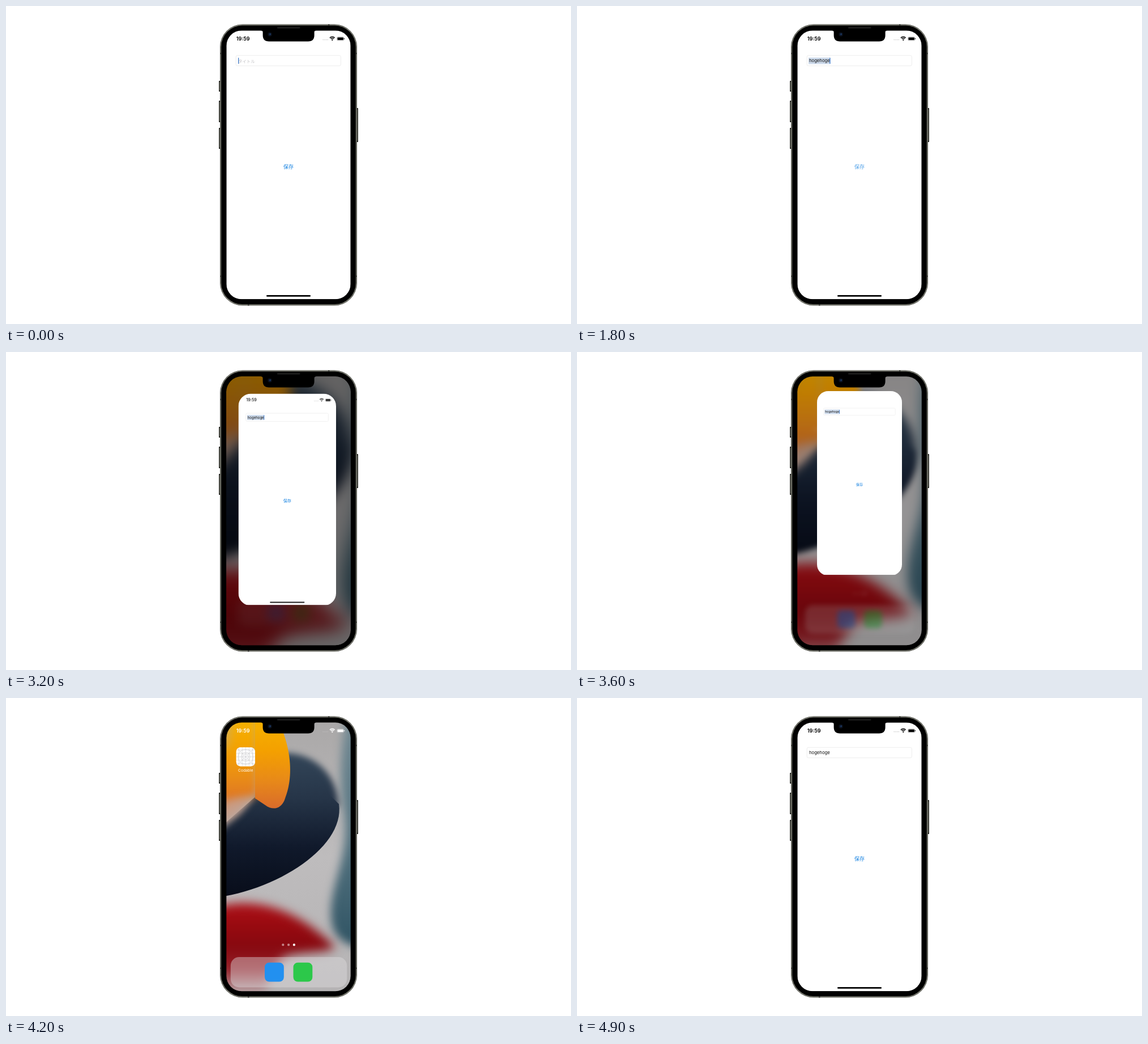
An HTML page with a canvas for the animation above (5 s loop, 998 by 561 pixels).

```html
<!DOCTYPE html>
<html lang="ja">
<head>
<meta charset="utf-8">
<title>Phone demo</title>
<style>
  html, body { margin: 0; width: 100%; height: 100%; overflow: hidden; background: #fff; }
  canvas { display: block; width: 998px; height: 561px; }
</style>
</head>
<body>
<canvas id="stage"></canvas>
<script>
const W = 998, H = 561, LOOP = 5000, STEP = 100;
const LATIN = 'Inter, "Noto Sans", sans-serif';
const JAPANESE = '"Noto Sans CJK JP", "Noto Sans CJK", sans-serif';
const TYPED = 'hogehoge';

// Poses of the app card
const SCREEN = { x: 389.3, y: 43.3, w: 219.4, h: 474 };
const HELD = { x: 410.5, y: 73.5, w: 172.5, h: 374 };
const THROWN = { x: 424, y: 69, w: 150, h: 325.5 };
const ICON = { x: 406.5, y: 87, w: 33.6, h: 33.6 };

const SELECT = 1300, PRESS = 1500, SWIPE = 3000, RELEASE = 3600, HOME = 4100, LAUNCH = 4400, OPEN = 4900;

const canvas = document.getElementById('stage');
const dpr = window.devicePixelRatio || 1;
canvas.width = W * dpr;
canvas.height = H * dpr;
const ctx = canvas.getContext('2d');
ctx.scale(dpr, dpr);

const clamp = v => Math.max(0, Math.min(1, v));
const span = (t, from, to) => clamp((t - from) / (to - from));
const easeOut = k => 1 - Math.pow(1 - k, 2.5);

function mix(a, b, k) {
  const at = key => a[key] + (b[key] - a[key]) * k;
  return { x: at('x'), y: at('y'), w: at('w'), h: at('h') };
}

function cardPose(t) {
  if (t >= LAUNCH) return mix(ICON, SCREEN, easeOut(span(t, LAUNCH, OPEN)));
  if (t >= RELEASE) return mix(THROWN, ICON, easeOut(span(t, RELEASE, HOME)));
  if (t >= 3200) return mix(HELD, THROWN, span(t, 3200, RELEASE));
  return mix(SCREEN, HELD, 0.25);
}

const homeProgress = t => t < LAUNCH ? span(t, 3200, 4000) : 1 - easeOut(span(t, LAUNCH, OPEN));

// One key per step, with a one-step pause after the fifth
const typedCount = t => Math.round(5 * span(t, 300, 800) + 3 * span(t, 900, 1200));

function cursorAlpha(t) {
  if (t < SELECT) return 1;
  const phase = Math.min(t, SWIPE) % 1000;
  return clamp((Math.abs(phase - 550) - 50) / 200);
}

const buttonAlpha = t => t < PRESS ? 1 : 0.25 + 0.75 * span(t, 1600, 1900);

function box(c, x, y, w, h, r, fill) {
  c.beginPath();
  c.roundRect(x, y, w, h, r);
  c.fillStyle = fill;
  c.fill();
}

function dot(c, x, y, r, fill) {
  c.beginPath();
  c.arc(x, y, r, 0, Math.PI * 2);
  c.fillStyle = fill;
  c.fill();
}

function label(c, text, x, y, font, fill, align = 'left') {
  c.font = font;
  c.fillStyle = fill;
  c.textAlign = align;
  c.fillText(text, x, y);
}

function faded(c, alpha, draw) {
  c.save();
  c.globalAlpha *= alpha;
  draw();
  c.restore();
}

function layer(draw) {
  const el = document.createElement('canvas');
  el.width = W * dpr;
  el.height = H * dpr;
  const c = el.getContext('2d');
  c.scale(dpr, dpr);
  draw(c);
  return el;
}

function drawLayer(image, scale, blur, alpha) {
  ctx.save();
  if (blur > 0.1) ctx.filter = `blur(${blur * dpr}px)`;
  ctx.globalAlpha = alpha;
  ctx.translate(499, 281);
  ctx.scale(scale, scale);
  ctx.drawImage(image, -499, -281, W, H);
  ctx.restore();
}

function ramp(c, y0, y1, ...colors) {
  const g = c.createLinearGradient(0, y0, 0, y1);
  colors.forEach((col, i) => g.addColorStop(i / (colors.length - 1), col));
  return g;
}

function blob(c, path, fill, blur = 0) {
  c.filter = blur ? `blur(${blur * dpr}px)` : 'none';
  c.fillStyle = fill;
  c.fill(new Path2D(path));
  c.filter = 'none';
}

const wallpaper = layer(c => {
  const teal = ramp(c, 60, 440, '#6f8791', '#557481', '#2f5363');
  const navy = ramp(c, 90, 350, '#34475a', '#263548', '#10192b', '#080d1a');
  const red = ramp(c, 355, 520, '#b0121a', '#9b0a10', '#86080f', '#952028', '#b8abad');
  const orange = ramp(c, 43, 195, '#f5b000', '#f4a000', '#e88a18', '#d96b2b');

  c.fillStyle = ramp(c, 43, 517, '#aaa8a8', '#bebcbd', '#b5b3b4');
  c.fillRect(0, 0, W, H);
  blob(c, 'M650 20H604C590 90 588 150 598 210C606 280 572 330 574 385C576 420 592 438 650 445Z', teal, 8);
  blob(c, 'M490 97C550 97 586 140 587 190L530 235L440 180Z', navy, 6);
  blob(c, 'M340 355C465 350 600 266 588 187L560 160L500 130L436 178L340 262Z', navy);
  blob(c, 'M340 130H440L434 178Q408 215 340 258Z', '#b9a69d', 7);
  blob(c, 'M340 380C415 345 500 358 582 440C560 452 515 446 490 458C470 480 455 510 440 570H340Z', red, 9);
  blob(c, 'M340 20H445V172Q400 180 340 210Z', orange, 8);
  blob(c, 'M440 20H470C495 60 515 125 492 180C485 197 470 198 458 189L440 177Z', orange);
  blob(c, 'M340 190L390 178L432 176L410 204L340 240Z', 'rgba(205,155,130,.6)', 7);
  blob(c, 'M340 20H398L390 85L340 110Z', 'rgba(185,172,145,.75)', 10);
});

function statusBar(c, color, dots) {
  label(c, '19:59', 406.8, 61, '600 9px ' + LATIN, color);
  for (let i = 0; i < 4; i++) dot(c, 560.2 + i * 2.7, 59.6, 0.7, dots);
  c.strokeStyle = color;
  c.lineWidth = 1.4;
  for (const r of [6.3, 3.9]) {
    c.beginPath();
    c.arc(576.3, 60.6, r, -Math.PI * 0.75, -Math.PI * 0.25);
    c.stroke();
  }
  c.beginPath();
  c.moveTo(576.3, 61.2);
  c.arc(576.3, 61.2, 2.3, -Math.PI * 0.75, -Math.PI * 0.25);
  c.fillStyle = color;
  c.fill();
  faded(c, 0.5, () => {
    c.lineWidth = 0.6;
    c.beginPath();
    c.roundRect(584.7, 54.7, 12, 6.2, 1.8);
    c.stroke();
  });
  box(c, 585.5, 55.5, 10.4, 4.6, 1.1, color);
  box(c, 597.2, 56.8, 0.8, 2, 0.4, color);
}

function appScreen(t) {
  const relaunched = t >= LAUNCH;
  const chrome = relaunched ? span(t, LAUNCH, 4700) : 1 - span(t, 3100, RELEASE);
  ctx.fillStyle = '#fff';
  ctx.fillRect(SCREEN.x, SCREEN.y, SCREEN.w, SCREEN.h);

  faded(ctx, chrome, () => {
    statusBar(ctx, '#000', '#aaa');
    box(ctx, 460, 510, 78, 2.8, 1.4, '#000');
  });

  ctx.strokeStyle = '#e9e9e9';
  ctx.lineWidth = 0.8;
  ctx.beginPath();
  ctx.roundRect(406.2, 87.2, 185.2, 18.4, 2.6);
  ctx.stroke();

  const text = TYPED.slice(0, typedCount(t));
  const font = '400 7.7px ' + LATIN;
  ctx.font = font;
  const end = 410 + ctx.measureText(text).width;
  if (t >= SELECT && !relaunched) box(ctx, 409, 91, end - 408.6, 11.4, 0, '#cddaeb');
  if (text) label(ctx, text, 410, 99.3, font, '#111');
  else label(ctx, 'タイトル', 410, 99.5, '400 7.4px ' + JAPANESE, '#c3c3c6');
  if (!relaunched) {
    faded(ctx, cursorAlpha(t), () =>
      box(ctx, text ? end - 0.4 : 410.1, 91.2, 1.2, 10.8, 0.5, '#2f6fc4'));
  }
  faded(ctx, buttonAlpha(t), () =>
    label(ctx, '保存', 499, 287.4, '400 9px ' + JAPANESE, '#1480e0', 'center'));
}

function gridIcon(c, { x, y, w, h }) {
  c.save();
  c.translate(x, y);
  c.scale(w / 100, h / 100);
  box(c, 0, 0, 100, 100, 24, '#fff');
  c.clip();
  c.strokeStyle = '#b4b4b8';
  c.lineWidth = 1.2;
  c.beginPath();
  for (let p = 14; p < 100; p += 18) {
    c.moveTo(p, 0); c.lineTo(p, 100);
    c.moveTo(0, p); c.lineTo(100, p);
  }
  c.moveTo(0, 0); c.lineTo(100, 100);
  c.moveTo(100, 0); c.lineTo(0, 100);
  for (const r of [14, 24, 40]) {
    c.moveTo(50 + r, 50);
    c.arc(50, 50, r, 0, Math.PI * 2);
  }
  c.stroke();
  c.restore();
}

const homeIcons = layer(c => {
  label(c, 'Codable', 423.2, 130, '400 6.7px ' + LATIN, '#fff', 'center');
  for (let i = 0; i < 3; i++) {
    dot(c, 489.3 + i * 9.8, 435.4, 2.1, i === 2 ? '#fff' : 'rgba(255,255,255,.5)');
  }
  box(c, 396.8, 457, 205.4, 53.5, 15, 'rgba(225,222,223,.42)');
  box(c, 457, 466.7, 33.8, 33.8, 8, '#2290f0');
  box(c, 507.5, 466.7, 33.8, 33.8, 8, '#2cc84a');
});

function homeScreen(progress) {
  const away = 1 - progress;
  drawLayer(wallpaper, 1 + 0.26 * away, 11 * away, 1);
  drawLayer(homeIcons, 1 - 0.12 * away, 9 * away, 0.3 + 0.7 * progress * progress);
  faded(ctx, span(progress, 0.6, 1), () => statusBar(ctx, '#fff', 'rgba(255,255,255,.3)'));
  ctx.fillStyle = `rgba(0,0,0,${0.43 * away})`;
  ctx.fillRect(SCREEN.x, SCREEN.y, SCREEN.w, SCREEN.h);
}

function card(t) {
  const pose = cardPose(t);
  const scale = pose.w / SCREEN.w;
  ctx.save();
  ctx.beginPath();
  ctx.roundRect(pose.x, pose.y, pose.w, pose.h, 8 + (pose.w - ICON.w) * 0.1);
  ctx.clip();
  ctx.save();
  ctx.translate(pose.x, pose.y);
  ctx.scale(scale, scale);
  ctx.translate(-SCREEN.x, -SCREEN.y);
  appScreen(t);
  ctx.restore();
  faded(ctx, 1 - span(pose.w, 50, 105), () => gridIcon(ctx, pose));
  ctx.restore();
}

function sideButton(x, y, h) {
  box(ctx, x, y, 3, h, 0.8, '#22231f');
  box(ctx, x + 0.9, y + 2, 0.8, h - 4, 0.4, '#85867c');
}

function phoneBody() {
  sideButton(376, 132, 19);
  sideButton(376, 167, 38);
  sideButton(376, 215, 37);
  sideButton(619, 180, 60);
  [[0, '#34352f'], [0.8, '#a6a79b'], [1.7, '#2a2b27'], [2.4, '#000']].forEach(([d, color]) =>
    box(ctx, 378 + d, 32.2 + d, 242 - 2 * d, 496.3 - 2 * d, 40 - d, color));
  const band = (x, y) => box(ctx, x, y, 2.5, 2.5, 0, '#3a3b36');
  for (const y of [82.5, 475.5]) {
    band(378, y);
    band(617.5, y);
  }
  band(569, 32.2);
  band(427, 526);
}

function notch() {
  ctx.fillStyle = '#000';
  ctx.fill(new Path2D('M450.5 42.5V43.3Q453.6 43.3 453.6 46.5V51.5Q453.6 62.5 464.6 62.5' +
    'H533.6Q544.6 62.5 544.6 51.5V46.5Q544.6 43.3 547.7 43.3V42.5Z'));
  box(ctx, 479, 37, 40.5, 2.8, 1.4, '#1b1b1b');
  dot(ctx, 466, 50, 3.8, '#0b0f18');
  dot(ctx, 466.2, 50, 1.9, '#14284a');
  dot(ctx, 467, 49.4, 0.7, '#2d5a8c');
}

function render(now) {
  const t = Math.floor((now % LOOP) / STEP) * STEP;
  ctx.fillStyle = '#fff';
  ctx.fillRect(0, 0, W, H);
  phoneBody();

  ctx.save();
  ctx.beginPath();
  ctx.roundRect(SCREEN.x, SCREEN.y, SCREEN.w, SCREEN.h, 27);
  ctx.clip();
  if (t < SWIPE || t >= OPEN) {
    appScreen(t);
  } else {
    homeScreen(homeProgress(t));
    card(t);
  }
  ctx.restore();
  notch();
}

const start = performance.now();
function tick() {
  render(performance.now() - start);
  requestAnimationFrame(tick);
}
tick();
</script>
</body>
</html>
```
